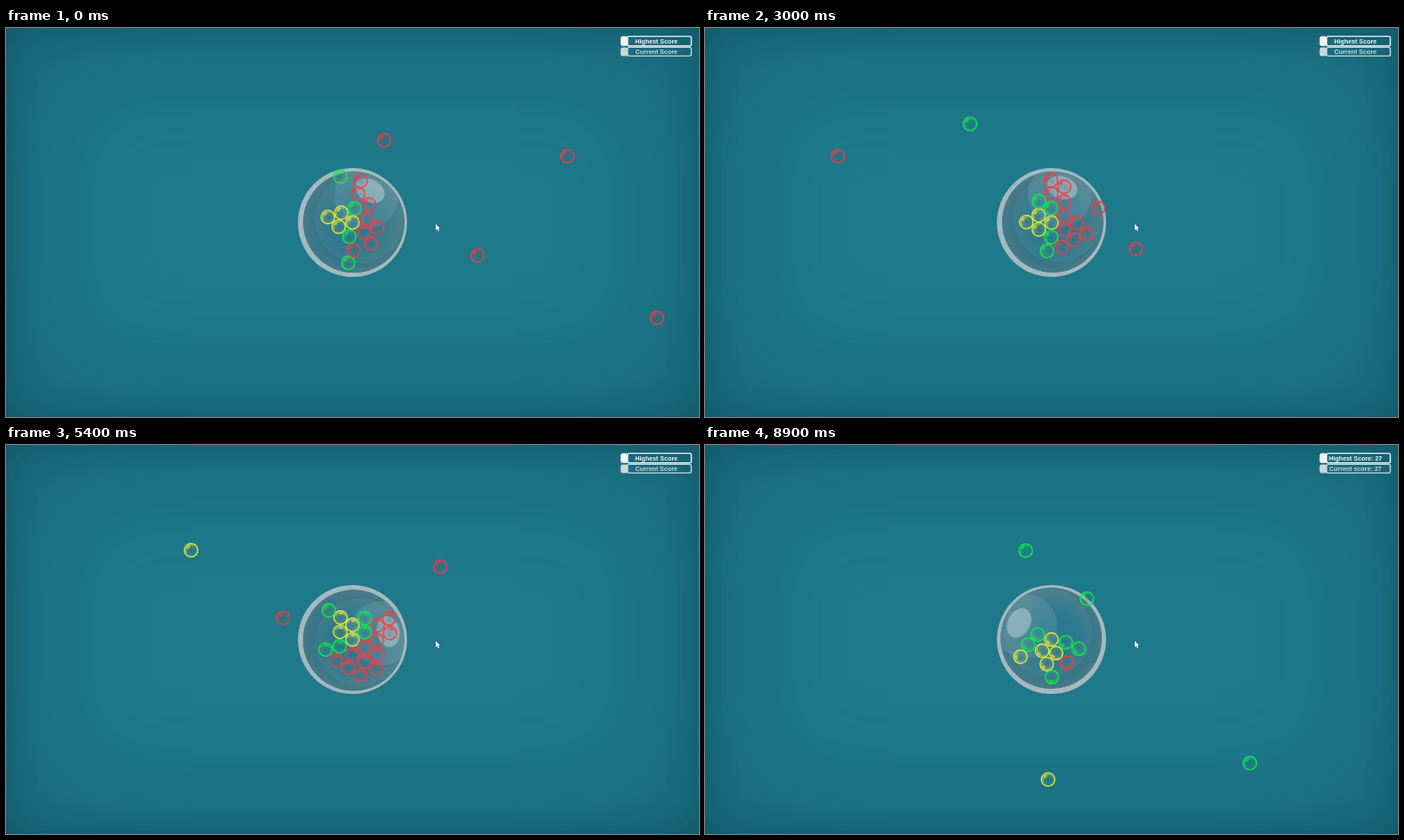
Write an HTML page with a canvas that moves like this. It is 800 px wide and 450 px high and loops after 9 s.

```html
<!DOCTYPE html>
<html lang="en">
<head>
<meta charset="utf-8">
<title>Bubble cluster</title>
<style>
  html, body { margin: 0; width: 100%; height: 100%; overflow: hidden; }
  #stage {
    position: relative; width: 800px; height: 450px; background: #1e798b;
    box-shadow: inset 0 0 150px rgba(8, 62, 76, .42), inset 0 0 34px rgba(8, 58, 72, .34);
  }
  canvas { position: absolute; left: 0; top: 0; }
</style>
</head>
<body>
<div id="stage"><canvas id="view" width="800" height="450"></canvas></div>
<script>
const ctx = document.getElementById('view').getContext('2d');
const LOOP = 9000, STEP = 100, CX = 400, CY = 225;
const RAD = Math.PI / 180, TAU = Math.PI * 2;
const FAST = 0.111, SLOW = 0.0465, SLOW_ZONE = 150, SETTLE = 250;
const RED = '236,62,72', GREEN = '22,232,76', YELLOW = '232,234,58';

// time, cluster rotation in degrees
const SPIN = [[0, 0], [900, -8], [2300, -26], [3900, 7], [5400, 49],
              [6500, 43], [7000, 24.5], [8330, -40], [8900, -91.5], [9000, -97]];

// Resting places are keys of time, angle and radius, turning with the cluster.
const held = (c, ...rest) => ({ c, rest });
// A flyer comes in along one angle, with a known radius at one time.
const flyer = (c, angle, at, radius, ...rest) => ({ c, angle, at, radius, rest });

const still = (c, a, r) => held(c, [0, a, r]);
const bubbles = [
  still(YELLOW, 0, 0), still(YELLOW, 221, 17), still(YELLOW, 163, 16.7), still(YELLOW, 192.5, 29),
  still(GREEN, 103, 16.8),
  held(GREEN, [0, -81, 16.5], [7400, -80, 16.5], [8100, -68.5, 17]),
  held(GREEN, [0, 96, 47], [1900, 96, 47], [2300, 97, 42], [2900, 110.5, 33.2]),
  still(RED, -79, 48.8), still(RED, -79, 33.6), still(RED, -48, 28.3), still(RED, -18, 16.3),
  still(RED, 12, 29), still(RED, 42, 16.8), still(RED, 49, 32.5),
  held(RED, [0, 88, 32], [900, 85, 31.8], [2300, 79, 30.6]),
  flyer(GREEN, 255.2, 0, 54.8, [0, 251, 28.7], [7400, 251, 28.7], [8100, 259, 27.8]),
  flyer(RED, -69, 450, 81, [0, -59, 44]),
  flyer(RED, -17.2, 2300, 89, [0, -18.2, 33.3]),
  flyer(RED, 14.8, 900, 107.5, [0, 33.6, 45.4], [2300, 33.6, 45.4], [3000, 28.5, 42.5]),
  flyer(RED, 17.4, 2300, 134.5, [0, 1.5, 43.5]),
  flyer(RED, -39.8, 5400, 131.5, [0, -48, 44]),
  Object.assign(flyer(RED, 197.3, 5400, 83.8, [0, 147.5, 32.6]), { safe: true }),
  flyer(GREEN, 230.5, 3900, 106, [0, 181, 43.5]),
  flyer(YELLOW, 209, 7000, 102, [0, 242.4, 41]),
  flyer(GREEN, -49.2, 7000, 152, [0, 0, 40]),
  flyer(GREEN, 253.8, 8900, 107, [0, 0, 40]),
  flyer(GREEN, 32, 8900, 270, [0, 0, 40]),
  flyer(YELLOW, 91.4, 8900, 162, [0, 0, 40])
];
const POP = 7350;

function track(keys, t) {
  let i = keys.findIndex(k => k[0] > t);
  if (i < 0) return keys[keys.length - 1].slice(1);
  if (i === 0) return keys[0].slice(1);
  const a = keys[i - 1], b = keys[i], u = (t - a[0]) / (b[0] - a[0]);
  return a.slice(1).map((v, n) => v + (b[n + 1] - v) * u);
}
const spin = t => track(SPIN, t)[0];

// Travel time to the centre, and its inverse.
const travel = r => r < SLOW_ZONE ? r / SLOW : SLOW_ZONE / SLOW + (r - SLOW_ZONE) / FAST;
const reach = s => s < SLOW_ZONE / SLOW ? s * SLOW : SLOW_ZONE + (s - SLOW_ZONE / SLOW) * FAST;

for (const b of bubbles) {
  if (b.at === undefined) continue;
  b.land = b.at + travel(b.radius) - travel(b.rest[0][2]);
}

function pose(b, t) {
  const turn = spin(t);
  if (b.at !== undefined && t < b.land)
    return { a: b.angle, r: reach(travel(b.radius) + b.at - t), tilt: 0 };
  let [a, r] = track(b.rest, t), from = 0;
  if (b.at !== undefined) {
    from = spin(b.land);
    const u = Math.min(1, (t - b.land) / SETTLE);
    let gap = b.angle - from - a;
    gap -= 360 * Math.round(gap / 360);
    a += gap * (1 - u) ** 2;
  }
  return { a: a + turn, r, tilt: turn - from };
}

function disc(x, y, r, fill) {
  ctx.beginPath();
  ctx.arc(x, y, r, 0, TAU);
  ctx.fillStyle = fill;
  ctx.fill();
}

function arc(r, from, to, width, stroke) {
  ctx.beginPath();
  ctx.arc(0, 0, r, from, to);
  ctx.lineWidth = width;
  ctx.strokeStyle = stroke;
  ctx.stroke();
}

function drawBubble(b, t) {
  const p = pose(b, t), c = b.c;
  ctx.save();
  ctx.translate(CX + p.r * Math.cos(p.a * RAD), CY + p.r * Math.sin(p.a * RAD));
  ctx.rotate(p.tilt * RAD);
  const g = ctx.createRadialGradient(1, 1, 1, 0, 0, 8);
  g.addColorStop(0, 'rgba(40,110,130,.25)');
  g.addColorStop(.65, `rgba(${c},.08)`);
  g.addColorStop(1, `rgba(${c},.36)`);
  disc(0, 0, 8, g);
  arc(7.8, 0, TAU, 1.4, `rgba(${c},.95)`);
  arc(5.7, 2.6, 5.2, 1.2, `rgba(${c},.5)`);
  ctx.beginPath();
  ctx.ellipse(-3.2, -3.6, 2.5, 1.7, -Math.PI / 4, 0, TAU);
  ctx.fillStyle = `rgba(${c},.6)`;
  ctx.fill();
  ctx.restore();
}

function drawGlass(t) {
  ctx.save();
  ctx.translate(CX, CY);
  ctx.rotate((spin(t) - 61.5) * RAD);
  // The x axis now points at the highlight.
  ctx.beginPath();
  ctx.arc(0, 0, 63, 0, TAU);
  ctx.arc(1, 1.2, 58.4, 0, TAU, true);
  ctx.fillStyle = '#a5b8be';
  ctx.fill();
  ctx.beginPath();
  ctx.arc(1, 1.2, 58.4, 0, TAU);
  ctx.clip();
  const g = ctx.createRadialGradient(-8, 8, 4, 0, 0, 60);
  g.addColorStop(0, '#1d748a');
  g.addColorStop(.4, '#27738a');
  g.addColorStop(.8, '#3c7788');
  g.addColorStop(1, '#4a7b88');
  disc(0, 0, 60, g);
  disc(7, 5, 51, 'rgba(170,205,215,.07)');
  disc(34, 0, 37, 'rgba(185,212,220,.13)');
  ctx.beginPath();
  ctx.ellipse(42, 0, 13, 18, 0, 0, TAU);
  ctx.fillStyle = 'rgba(190,210,216,.52)';
  ctx.fill();
  ctx.restore();
}

function drawPanel(y, h, label, color) {
  ctx.fillStyle = ctx.strokeStyle = color;
  ctx.beginPath();
  ctx.roundRect(709.5, y, 8.5, h, 2.5);
  ctx.fill();
  ctx.lineWidth = 1.4;
  ctx.beginPath();
  ctx.roundRect(717.6, y, 73.5, h, 1.8);
  ctx.stroke();
  ctx.font = 'bold 7.3px "Liberation Sans", Arial, sans-serif';
  ctx.textAlign = 'center';
  ctx.textBaseline = 'alphabetic';
  ctx.fillText(label, 750.8, y + h / 2 + 2.6);
}

function drawScores(t) {
  const score = t < POP ? 22 : t < 8350 ? 26 : 27;
  const counting = t >= 6600;
  drawPanel(9.6, 11.2, counting ? `Highest Score: ${score}` : 'Highest Score', '#f0f4f5');
  drawPanel(22.4, 10, counting ? `Current score: ${score}` : 'Current Score', '#c9d6da');
}

function drawCursor() {
  ctx.beginPath();
  [[496, 226.4], [496, 234], [497.8, 232.5], [499, 235.2], [500.3, 234.6],
   [499.2, 232], [501, 231.8]].forEach(([x, y]) => ctx.lineTo(x, y));
  ctx.closePath();
  ctx.lineWidth = .9;
  ctx.strokeStyle = '#234c57';
  ctx.stroke();
  ctx.fillStyle = '#f2f2f2';
  ctx.fill();
}

function draw(t) {
  ctx.clearRect(0, 0, 800, 450);
  drawGlass(t);
  for (const b of bubbles) {
    if (b.c === RED && !b.safe && t >= POP) continue;
    drawBubble(b, t);
  }
  drawScores(t);
  drawCursor();
}

const start = performance.now();
function tick() {
  const t = (performance.now() - start) % LOOP;
  draw(Math.floor(t / STEP) * STEP);
  requestAnimationFrame(tick);
}
tick();
</script>
</body>
</html>
```
